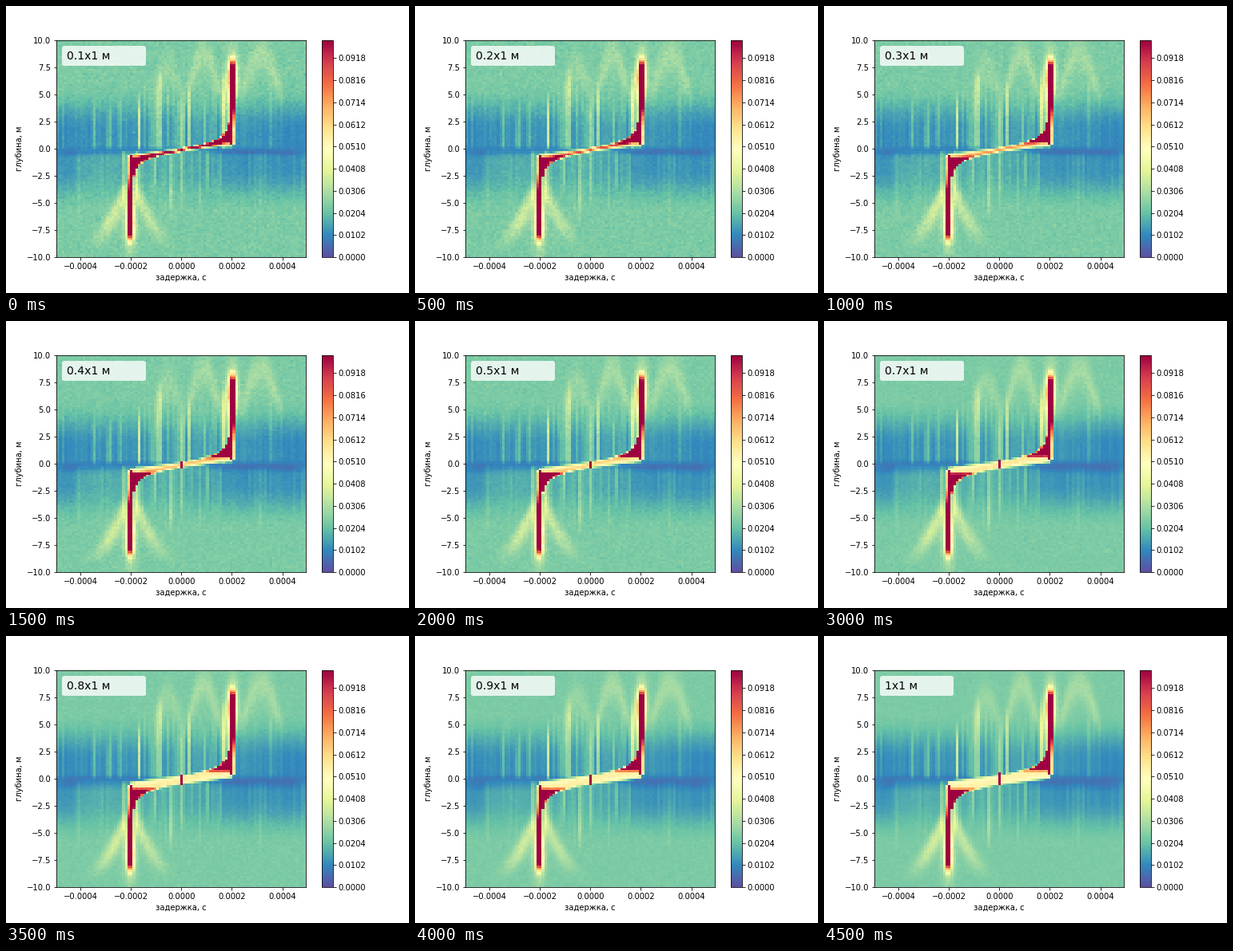
Recreate the animation shown at these times as a matplotlib script. Size 504x360 px, loop 5000 ms.

```python
import numpy as np
import matplotlib.pyplot as plt
from matplotlib.animation import FuncAnimation
from matplotlib.lines import Line2D
from matplotlib.ticker import MultipleLocator

plt.rcParams.update({"font.family": "DejaVu Sans", "font.size": 10})

FRAMES, STEP_MS = 10, 500
RATE = 96000            # samples per second: one column per sample of delay
COLS, ROWS = 95, 100
T_MAX, T_EDGE, D_MAX = COLS / RATE / 2, 2e-4, 10.0
HALF = 156.24           # half width of the map, in screen units
BEND = HALF * T_EDGE / T_MAX
DY = 2 * D_MAX / ROWS

t_edges = np.linspace(-T_MAX, T_MAX, COLS + 1)
d_edges = np.linspace(-D_MAX, D_MAX, ROWS + 1)
p = ((t_edges[:-1] + t_edges[1:]) / 2 / T_MAX * HALF)[None, :]
y = d_edges[1:, None]
U = np.abs(p) / BEND
yy = y * np.where(p < 0, -1, 1)     # depth folded onto the right-hand branch


def smooth(v):
    v = np.clip(v, 0, 1)
    return v * v * (3 - 2 * v)


def bell(v, width):
    return np.exp(-(v / width) ** 2)


def streak(x, amp, top, depth):
    fade = smooth((depth + .1) / .5) * (1 - smooth((depth - top + 2) / 3.2))
    return amp * bell(p - x, 2.6) * fade


def random_streaks(rng, depth, scale):
    amp = rng.exponential(scale, COLS) * (.35 + bell(p, 85))
    top = rng.uniform(3.5, 6, COLS)
    return amp * smooth((depth + .1) / .5) * (1 - smooth((depth - top + 2) / 3.2))


def arch(x, top, spread, amp):
    crest = top - ((p - x) / spread) ** 2
    return amp * bell(y - crest, 1.5) * smooth((y - 3.5) / 3)


def background():
    rng = np.random.default_rng(4)
    up = .0115 + .0025 * (p / HALF) ** 2
    down = .0075 + .0045 * smooth(p / 80) + .004 * smooth((-p - 115) / 30)
    up_zone = smooth((y + .2) / .4) * (1 - smooth((y - 1.8) / 4.4))
    down_zone = smooth((.2 - y) / .4) * (1 - smooth((-y - 1.7) / 4.3))
    z = .0233 - up * up_zone - down * down_zone
    z += random_streaks(rng, y, .0035) + random_streaks(rng, -y, .0018)
    for x, amp, top in ((-27, .013, 7), (1, .015, 4.5), (53, .014, 7), (58, .014, 8)):
        z += streak(x, amp, top, y)
    z += streak(8 - BEND, .018, 5, -y) + streak(-8 - BEND, .009, 5.5, -y)
    z += arch(28, 8.8, 10, .006) + arch(100, 8.8, 12, .006) + arch(-17, 7.6, 10, .004)

    # arms spreading below the left bar
    drop = np.clip(-y - 3, 0, None)
    reach = 7 + 2.6 * drop ** 1.5
    shade = smooth((-y - 2.5) / 2) * (1 - smooth((-y - 6) / 3.7))
    for s, amp in ((-1, .013), (1, .010)):
        z += amp * bell(p + BEND - s * reach, 5 + 1.2 * drop) * shade

    # vertical bars at both ends of the curve
    fade = smooth((yy - .4) / .3) * (1 - smooth((yy - 6.3) / 2.8))
    off = np.abs(p) - 63 - .35 * np.clip(yy - 2, 0, 3)
    width = 2.4 + .3 * np.clip(yy - 4, 0, 3)
    z += .17 * bell(off, width) * fade
    z += .024 * bell(off, 7) * bell(yy - 6.8, 2.2)
    return z


BASE = background()


def band(size):
    """Coverage and strength of the S-shaped band, which thickens with size."""
    w = .07 + .34 * size
    u = np.clip(U, 0, .995)
    low = .55 * u - w
    high = np.minimum(.85 * u / np.sqrt(1 - u * u), 7) + w
    cover = np.clip((yy - low) / DY + .5, 0, 1) * np.clip((high - yy) / DY + .5, 0, 1)
    rise = smooth((yy - .45 - .2 * size) / (.3 + .2 * size))
    peak = np.minimum(.046 + .008 / size + .075 * rise, .14)
    ramp = smooth((yy - low) / np.minimum(.65, .6 * (high - low)))
    return cover * (U < 1.04), .05 + (peak - .05) * ramp


def field(n):
    size = (n + 1) / FRAMES
    rng = np.random.default_rng(100 + n)
    z = BASE.copy()

    # dark wedge beside the curve
    slant = -.05 - .25 * np.abs(p) / HALF
    wedge = bell(y - slant, .25 + .35 * size) * smooth((np.abs(p) - 8) / 50)
    z -= .0055 * wedge * (1 - .5 * smooth((np.abs(p) - 135) / 20))

    cover, amp = band(size)
    z = np.maximum(z, z + (amp - z) * cover)

    # zero-delay core, growing by whole rows
    if size > .35:
        mid = ROWS // 2 - 1
        z[mid - (n + 1) // 4:mid + (n + 3) // 4 + 1, COLS // 2] = .12

    noise = rng.normal(0, 1, z.shape)
    z += noise * (.0004 + .0008 * (1 - size)) * np.clip(z / .022, .4, 1.5)
    return np.clip(z, 0, None)


fig = plt.figure(figsize=(7, 5), dpi=72, facecolor="white")
fig.subplots_adjust(left=.125, right=.9, bottom=.125, top=.88)
ax = fig.add_subplot()
mesh = ax.pcolormesh(t_edges, d_edges, field(0), cmap="Spectral_r", vmin=0, vmax=.1)
ax.set(xlim=(-T_MAX, T_MAX), ylim=(-D_MAX, D_MAX),
       xlabel="задержка, с", ylabel="глубина, м")
ax.xaxis.set_major_locator(MultipleLocator(2e-4))
ax.yaxis.set_major_locator(MultipleLocator(2.5))

bar = fig.colorbar(mesh, ax=ax, ticks=np.linspace(0, .1, 50)[::5], format="%.4f")
bar.minorticks_off()

blank = Line2D([], [], linestyle="none")
legend = ax.legend([blank], ["0.1x1 м"], loc="upper left", fontsize=14,
                   markerfirst=False, framealpha=.8, edgecolor="none")
label = legend.get_texts()[0]


def update(n):
    mesh.set_array(field(n))
    label.set_text(f"{(n + 1) / FRAMES:g}x1 м")
    return mesh, label


anim = FuncAnimation(fig, update, frames=FRAMES, interval=STEP_MS,
                     repeat=True, repeat_delay=0, blit=False)
plt.show()
```
